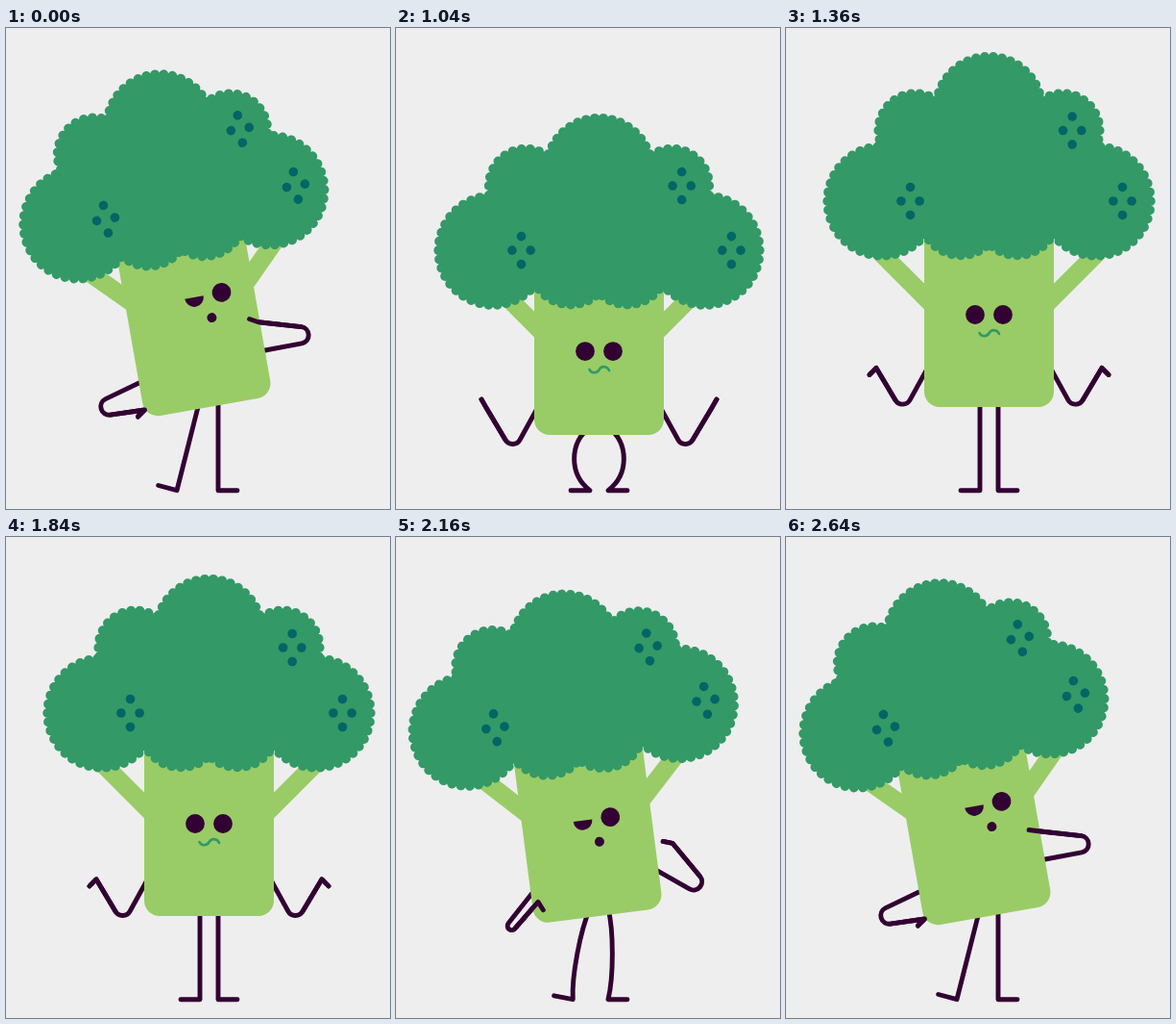
An HTML page that plays this animation: 400x500 px, repeating every 2720 ms.

```html
<!DOCTYPE html>
<html lang="en">
<head>
<meta charset="utf-8">
<title>Broccoli</title>
<style>
  html, body { margin: 0; width: 100%; height: 100%; overflow: hidden; background: #eee; }
  svg { display: block; width: 400px; height: 500px; }
  .limb { fill: none; stroke: #303; stroke-width: 4.9; stroke-linecap: round; stroke-linejoin: round; }
  .branch { stroke: #9c6; stroke-width: 18.8; }
  .leaf { fill: #396; }
  .bumps { stroke: #396; stroke-width: 10; stroke-linecap: round; stroke-dasharray: 0 1; }
  .squiggle { fill: none; stroke: #396; stroke-width: 2.6; stroke-linecap: round; }
</style>
</head>
<body>
<svg id="stage" viewBox="0 0 400 500"></svg>
<script>
const LOOP = 2720, STEP = 80;
const AXIS = 211.5, BASE = 394, FLOOR = 480.7;
const HOP = 1040, TURN = 2090;

const mix = (a, b, k) => a + (b - a) * k;
function ease(t, from, to) {
  const k = Math.min(1, Math.max(0, (t - from) / (to - from)));
  return k * k * (3 - 2 * k);
}
const pulse = (t, from, peak, to) => ease(t, from, peak) - ease(t, peak, to);
// Sink to 1, spring up to -1, settle at 0.
const bounce = u => ease(u, -240, 0) - 2 * ease(u, 0, 260) + ease(u, 230, 460);

const stage = document.getElementById('stage');
function set(el, attrs) {
  for (const k in attrs) el.setAttribute(k, attrs[k]);
  return el;
}
function add(parent, tag, attrs) {
  const el = document.createElementNS('http://www.w3.org/2000/svg', tag);
  parent.append(el);
  return set(el, attrs);
}
const move = (el, x, y) => set(el, { transform: `translate(${x} ${y})` });
const show = (el, on) => set(el, { visibility: on ? 'visible' : 'hidden' });

const limb = () => add(stage, 'path', { class: 'limb' });
const legL = limb(), legR = limb(), armL = limb(), armR = limb();
const body = add(stage, 'g');
const foreL = limb(), foreR = limb();

const branches = add(body, 'path', { class: 'branch', d: 'M-50-97.5l-62-62M50-97.5l62-62' });
add(body, 'rect', { x: -67.5, y: -215, width: 135, height: 215, rx: 16, fill: '#9c6' });
const core = add(body, 'polygon', { class: 'leaf' });

const blob = (r, bumps) => add(body, 'circle', { class: 'leaf bumps', r, pathLength: bumps });
const sideL = blob(56.7, 38), sideR = blob(56.7, 38);
const upperL = blob(38.4, 26), upperR = blob(38.4, 26);
const crest = blob(55.3, 38), lumpL = blob(42.3, 28), lumpR = blob(42.3, 28);

function spots() {
  const g = add(body, 'g', { fill: '#066' });
  for (const k of [-1, 1]) {
    add(g, 'circle', { cx: k * 9.6, r: 4.8 });
    add(g, 'circle', { cy: k * 14.5, r: 4.8 });
  }
  return g;
}
const spotsL = spots(), spotsR = spots(), spotsTop = spots();

const face = add(body, 'g', { fill: '#303' });
add(face, 'circle', { cx: 14.5, r: 9.9 });
const wink = add(face, 'g');
add(wink, 'path', { d: 'M-24.4 0a9.9 9.9 0 0 0 19.8 0z' });
add(wink, 'circle', { cy: 24, r: 5 });
const stare = add(face, 'g');
add(stare, 'circle', { cx: -14.5, r: 9.9 });
add(stare, 'path', { class: 'squiggle', d: 'M-10 19c2 4.5 8 4 10.2 0s8-4 10.3 1' });

// An arm pose: shoulder, elbow centre, wrist, hand angle.
const mirror = ([sx, sy, ox, oy, wx, wy, a]) =>
  [2 * AXIS - sx, sy, 2 * AXIS - ox, oy, 2 * AXIS - wx, wy, 180 - a];
const front = [149, 353, 121.5, 384.8, 94, 355.8, 135];
const poses = {
  L: { sassy: [149, 364, 107.5, 393.5, 144.5, 397, 135], front, turn: [145, 364, 120.5, 402, 148, 377, 58] },
  R: { sassy: [262, 336.5, 306.5, 319.3, 263, 305.7, 170], front: mirror(front), turn: [266, 341, 310, 356, 288, 316, 191] }
};

function armPose(t, { sassy, front, turn }, wave) {
  const a = [...sassy];
  a[6] += wave;
  const toFront = ease(t, 780, 1040), toTurn = ease(t, 1840, 2160), back = ease(t, 2160, 2320);
  return a.map((v, i) => mix(mix(mix(v, front[i], toFront), turn[i], toTurn), v, back));
}

// Lines from shoulder and wrist touch a round elbow that tightens as the arm folds.
function drawArm(whole, fore, [sx, sy, ox, oy, wx, wy, angle], drop, flick) {
  const ax = sx - ox, ay = sy - oy, bx = wx - ox, by = wy - oy;
  const cross = ax * by - ay * bx;
  const fold = Math.abs(Math.atan2(cross, ax * bx + ay * by));
  const r = 8.7 * Math.min(1, fold / 0.52);
  const dir = cross < 0 ? 1 : -1;
  const touch = (x, y, d) => {
    const a = Math.atan2(y, x) + d * Math.acos(Math.min(1, r / Math.hypot(x, y)));
    return `${ox + r * Math.cos(a)} ${oy + r * Math.sin(a) + drop}`;
  };
  const from = touch(ax, ay, dir), to = touch(bx, by, -dir);
  const hand = (angle + flick) * Math.PI / 180;
  const tip = `L${wx} ${wy + drop}l${10 * Math.cos(hand)} ${10 * Math.sin(hand)}`;
  set(whole, { d: `M${sx} ${sy + drop}L${from}A${r} ${r} 0 0 ${dir > 0 ? 1 : 0} ${to}${tip}` });
  set(fore, { d: `M${to}${tip}` });
}

function drawLeg(el, side, hipY, ankle, bow) {
  const hip = AXIS + side * 9.5;
  const a = Math.atan2(hip - ankle, 89);
  const at = k => `${mix(hip, ankle, k) + side * bow} ${mix(hipY, FLOOR, k)}`;
  set(el, { d: `M${hip} ${hipY}C${at(.25)} ${at(.75)} ${ankle} ${FLOOR}l${side * 20 * Math.cos(a)} ${-20 * Math.sin(a)}` });
}

function drawCrown(spread, side, top) {
  const sy = side - 211, ty = top - 295, ly = side - 197;
  const ux = 72 + (spread - 101.5) * 0.47, uy = (side + top) / 2 - 279;
  const spotsAt = [
    [sideL, -spread, sy], [upperL, -ux, uy], [crest, 0, ty], [upperR, ux, uy],
    [sideR, spread, sy], [lumpR, 29.5, ly], [lumpL, -29.5, ly]
  ];
  for (const [el, x, y] of spotsAt) move(el, x, y);
  set(core, { points: spotsAt.map(([, x, y]) => `${x},${y}`).join(' ') });
  move(spotsL, 29.5 - spread, sy);
  move(spotsR, 27.5 + spread, sy);
  move(spotsTop, ux + 10, uy);
}

function render(t) {
  const lean = 1 - ease(t, 780, 1040) + ease(t, 1842, 2320);
  const narrow = 1 - ease(t, 800, 1100) + ease(t, 2160, 2480);
  const dip = 29 * pulse(t, 800, HOP, 1240);
  const top = 21 * (bounce(t - HOP) + bounce(t - TURN));
  const squash = 0.43 * Math.max(0, top);
  const late = lean * lean;

  set(body, { transform: `translate(${AXIS} ${BASE + dip}) rotate(${-10 * lean})` });
  move(branches, 0, -13 * late);
  drawCrown(111.5 - 10 * narrow, 0.22 * top + 0.5 * dip, top);

  move(face, 19 * late, squash - 96 - 19 * late);
  show(wink, lean > 0.4);
  show(stare, lean <= 0.4);

  const hipY = BASE + dip - 8, bow = squash + 0.44 * dip;
  drawLeg(legL, -1, hipY, AXIS - 9.5 - 24 * lean, bow);
  drawLeg(legR, 1, hipY, AXIS + 9.5, bow);

  const drop = 0.17 * top + 1.22 * dip;
  const flick = 105 * pulse(t, 800, HOP, 1300);
  const wave = 29 * Math.cos(2 * Math.PI * (t > LOOP / 2 ? t - LOOP : t) / 533);
  drawArm(armL, foreL, armPose(t, poses.L, 0), drop, flick);
  drawArm(armR, foreR, armPose(t, poses.R, wave), drop, -flick);
}

const start = performance.now();
function tick() {
  const t = (performance.now() - start) % LOOP;
  render(Math.floor(t / STEP) * STEP);
  requestAnimationFrame(tick);
}
tick();
</script>
</body>
</html>
```
